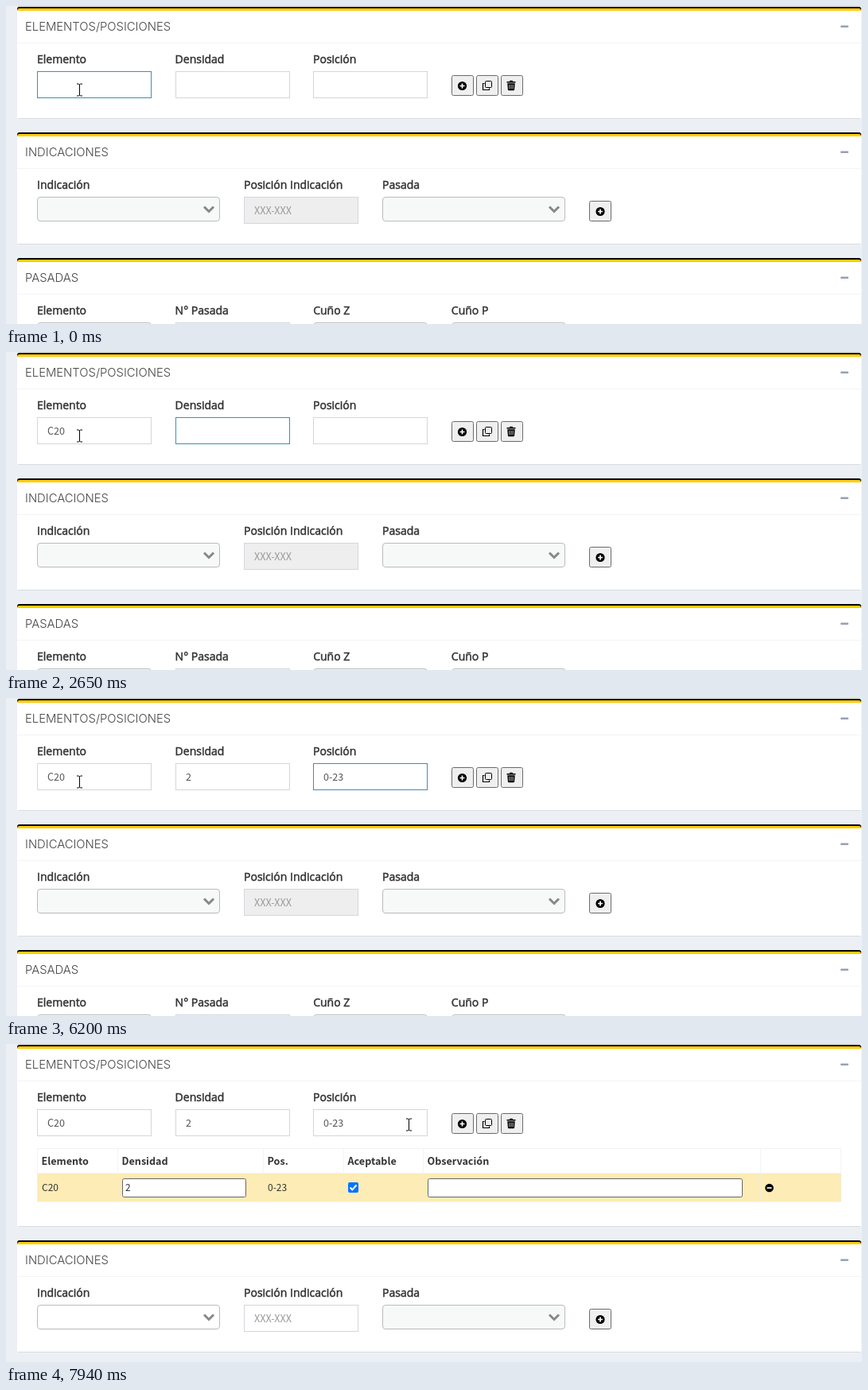
Animation of 1076 by 400 pixels, one loop 7.99 s. Source, as an HTML page:

```html
<!DOCTYPE html>
<html lang="es">
<head>
<meta charset="utf-8">
<style>
  html, body { margin: 0; width: 100%; height: 100%; overflow: hidden; background: #ecf0f5; }
  svg { display: block; }
  .title { font: 300 14.8px Inter, sans-serif; fill: #444; }
  .label { font: 14px "Open Sans", sans-serif; fill: #333; stroke: #333; stroke-width: .5px; }
  .value, .cell, .head { font: 12.6px "Noto Sans CJK SC", "Noto Sans CJK JP", "Noto Sans", sans-serif; fill: #555; }
  .hint { fill: #999; }
  .cell { font-size: 12px; fill: #333; }
  .head { font-weight: 700; fill: #333; }
  .option { font: 500 11.8px Inter, sans-serif; fill: #000; }
  .popup { filter: drop-shadow(0 1px 1.5px rgba(0, 0, 0, .4)); }
</style>
</head>
<body>
<svg id="stage" width="1076" height="400" viewBox="0 0 1076 400"></svg>
<script>
const LOOP = 7990, SUBMIT = 7880;
const BLUE = [60, 141, 188], GREY = [210, 214, 222];
const stage = document.getElementById('stage');
const pen = document.createElement('canvas').getContext('2d');
pen.font = '12.6px "Noto Sans CJK SC", "Noto Sans CJK JP", "Noto Sans", sans-serif';

// Typed values: [time, text]
const fields = [
  { x: 39, label: 'Elemento', typed: [[710, 'C'], [1450, 'C2'], [1550, 'C20']], focus: [-1000, 2130] },
  { x: 212.6, label: 'Densidad', typed: [[2950, '2']], focus: [2130, 3520] },
  { x: 386, label: 'Posición', typed: [[4450, '0'], [5150, '0-'], [5450, '0-2'], [5650, '0-23']], focus: [3520, 7810] }
];
// The caret alternates on and off at these times.
const caretFlips = [280, 1270, 1450, 2650, 2950, 3450, 3520, 4020, 4450, 5020, 5150, 6200, 6700, 7250];
const popups = [
  { from: 710, to: 1450, x: 39, items: ['C10', 'C12', 'C15', 'C20', 'C25', 'C30'] },
  { from: 1450, to: 1550, x: 39, items: ['C20', 'C25'] },
  { from: 4450, to: 5450, x: 386, items: ['0-19', '0-90'] }
];

const rect = (x, y, w, h, fill, r = 0) =>
  `<rect x="${x}" y="${y}" width="${w}" height="${h}" rx="${r}" fill="${fill}"/>`;
const box = (x, y, w, h, fill, stroke, r = 0) =>
  `<rect x="${Math.round(x) + .5}" y="${y + .5}" width="${w - 1}" height="${h - 1}" rx="${r}" fill="${fill}" stroke="${stroke}"/>`;
const text = (cls, x, y, s) => `<text class="${cls}" x="${x}" y="${y}">${s}</text>`;
const path = (d, fill, stroke = 'none', w = 1) =>
  `<path d="${d}" fill="${fill}" stroke="${stroke}" stroke-width="${w}"/>`;
const at = (x, y, s) => `<g transform="translate(${x} ${y})">${s}</g>`;
const mix = k => `rgb(${GREY.map((g, i) => Math.round(g + (BLUE[i] - g) * k))})`;

const panel = (y, h, title, body) => at(0, y,
  rect(14, 1, 1061, h, '#d8dce1', 3) + rect(14, 0, 1061, 12, '#000', 3) +
  path(`M14 5q0-3 3-3H1072q3 0 3 3V${h}H14Z`, '#fc0') + rect(14, 5, 1061, h - 5, '#fff') +
  rect(14, 45, 1061, 1, '#f4f4f4') + rect(1049, 23.5, 10, 2.5, '#97a0b3', 1) +
  text('title', 24, 30, title) + body);

const circleIcon = (x, y, plus, r = 5.6) => at(x, y,
  `<circle r="${r}" fill="#000"/>` + path('M-3 0H3' + (plus ? 'M0-3V3' : ''), 'none', '#fff', 1.7));
const button = (x, y, icon, fill = '#efefef', stroke = '#6b6b6b') => box(x, y, 28, 26, fill, stroke, 2) + icon;
const cloneIcon = box(602, 94, 9, 9, 'none', '#000', 1) + path('M601.5 97.5h-2v8h8v-2', 'none', '#000', 1.2);
const trashIcon = at(635, 100, path('M-5.5-5h3.3l.8-1.3h2.8l.8 1.3H5.5v1.4h-11Z M-4.7-2.8H4.7L4.1 5q-.1 1.2-1.2 1.2h-5.8q-1.1 0-1.2-1.2Z', '#000') +
  path('M-2.2-1.2v5.6M0-1.2v5.6M2.2-1.2v5.6', 'none', '#efefef', .8));
const select = (x, fill) => box(x, 81, 230, 31, fill, '#bbb', 3.5) +
  path(`M${x + 210} 93.5l6 6 6-6`, 'none', '#888', 3);

const cursors = {
  beam: path('M-3.5-7.5h2.5l1 1 1-1h2.5M0-6.5V6.5M-3.5 7.5h2.5l1-1 1 1h2.5', 'none', '#000'),
  arrow: path('M.5.5V16.8l3.8-3.6 2.5 5.8 2.5-1.1-2.5-5.6h5.3Z', '#fff', '#000'),
  hand: at(-6, 0, path('M5 2Q6.5-.5 8 2V8q2.5-1 3 1 2.5-.8 3 1 2.5-.3 2.5 2v4q0 3-2 4.500v2h-8V20L1 13.500q-1-2.500 1.500-2.500L5 13Z', '#fff', '#000') +
    path('M8 8v3M11 9v3M14 10v2', 'none', '#000'))
};

function cursor(t) {
  let x = 92, y = 105, kind = 'beam';
  if (t >= 7940) [x, y] = [506, 101];
  else if (t >= SUBMIT) [x, y, kind] = [538, 101, 'arrow'];
  else if (t >= 6400) {
    const p = Math.min(1, (Math.floor((t - 6400) / 65) + 1) / 13);
    const e = p < .5 ? .5 * (2 * p) ** 2.7 : 1 - .5 * (2 - 2 * p) ** 2.7;
    x = Math.round(92 + 471 * e);
    y = Math.round(105 - 8 * e + 12.8 * Math.sin(Math.PI * p));
    const inField = fields.some(f => x >= f.x && x <= f.x + 144) && y < 116;
    kind = x >= 560 ? 'hand' : inField ? 'beam' : 'arrow';
  }
  const nudge = kind === 'beam' ? .5 : 0;
  return at(x + nudge, y + nudge, cursors[kind]);
}

function focusLevel([from, to], t) {
  if (t < from || t >= to + 70) return 0;
  if (t < from + 70) return .5;
  return t < to ? 1 : to === 7810 ? .8 : .4;
}

function field(f, t) {
  const value = f.typed.reduce((v, [time, s]) => t >= time ? s : v, '');
  const caretOn = caretFlips.filter(c => c <= t).length % 2;
  const focused = t >= f.focus[0] && t < f.focus[1];
  const x = Math.round(f.x) + 13;
  return text('label', f.x, 71, f.label) + box(f.x, 81, 144, 34, '#fff', mix(focusLevel(f.focus, t))) +
    text('value', x, 103, value) +
    (focused && caretOn ? rect(x + Math.round(pen.measureText(value).width), 89, 1, 18, '#222') : '');
}

function table() {
  const columns = [39, 140, 323, 424, 524, 948, 1049];
  const heads = ['Elemento', 'Densidad', 'Pos.', 'Aceptable', 'Observación'];
  return rect(39, 163, 1011, 35, '#fdecb5') +
    columns.map(x => rect(x, 131, 1, 67, 'rgba(238,238,238,.65)')).join('') +
    [131, 162, 198].map(y => rect(39, y, 1011, 1, '#f2f2f2')).join('') +
    heads.map((s, i) => text('head', columns[i] + 5.5, 152, s)).join('') +
    text('cell', 45, 185, 'C20') + text('cell', 329, 185, '0-23') +
    box(146, 169, 156, 24, '#fff', '#666', 2) + text('cell', 150, 185, '2') +
    box(530, 169, 396, 24, '#fff', '#666', 2) +
    rect(430, 174, 13, 13, '#0075ff', 2) + path('M432.500 180.500l2.800 2.800 5.200-5.800', 'none', '#fff', 2) +
    circleIcon(959.5, 181, false, 5.3);
}

function popup({ x, items }) {
  const h = items.length * 36 + 17;
  return `<g class="popup">${rect(x, 117, 192, h, '#fff', 2)}</g>` +
    items.map((s, i) => text('option', x + 12, 148 + 36 * i, s)).join('');
}

function scene(t) {
  const done = t >= SUBMIT, shift = done ? 88 : 0;
  const pressed = t >= 7740 && !done, hovered = t >= 7170 && !done;
  const addFill = pressed ? '#f5f5f5' : hovered ? '#e5e5e5' : '#efefef';
  const addStroke = pressed ? '#8d8d8d' : hovered ? '#4f4f4f' : '#6b6b6b';

  const elements = fields.map(f => field(f, t)).join('') + at(0, -1,
    button(560, 87, circleIcon(573.5, 100.5, true), addFill, addStroke) +
    button(591, 87, cloneIcon) + button(622, 87, trashIcon) + (done ? table() : ''));

  const marks = [[39, 'Indicación'], [299, 'Posición Indicación'], [473, 'Pasada']]
    .map(([x, s]) => text('label', x, 71, s)).join('') +
    select(39, done ? '#fff' : '#f7f8f8') + select(473, '#f7f8f8') +
    box(299, 81, 144, 34, done ? '#fff' : '#eee', '#d2d6de') + text('value hint', 312, 103, 'XXX-XXX') +
    button(733, 86, circleIcon(747, 99.5, true));

  const passes = ['Elemento', 'N° Pasada', 'Cuño Z', 'Cuño P'].map((s, i) => {
    const x = 39 + 173.6 * i;
    return text('label', x, 71, s) + box(x, 81, 144, 34, i === 1 ? '#eee' : '#f7f8f8', i === 1 ? '#d2d6de' : '#bbb', i === 1 ? 0 : 3.5);
  }).join('');

  return rect(0, 0, 1076, 400, '#ecf0f5') +
    panel(1, 140 + shift, 'ELEMENTOS/POSICIONES', elements) +
    panel(159 + shift, 140, 'INDICACIONES', marks) +
    panel(317 + shift, 140, 'PASADAS', passes) +
    popups.filter(p => t >= p.from && t < p.to).map(popup).join('') + cursor(t);
}

let shown = '';
const start = performance.now();
function frame() {
  const next = scene((performance.now() - start) % LOOP);
  if (next !== shown) stage.innerHTML = shown = next;
  requestAnimationFrame(frame);
}
frame();
</script>
</body>
</html>
```
